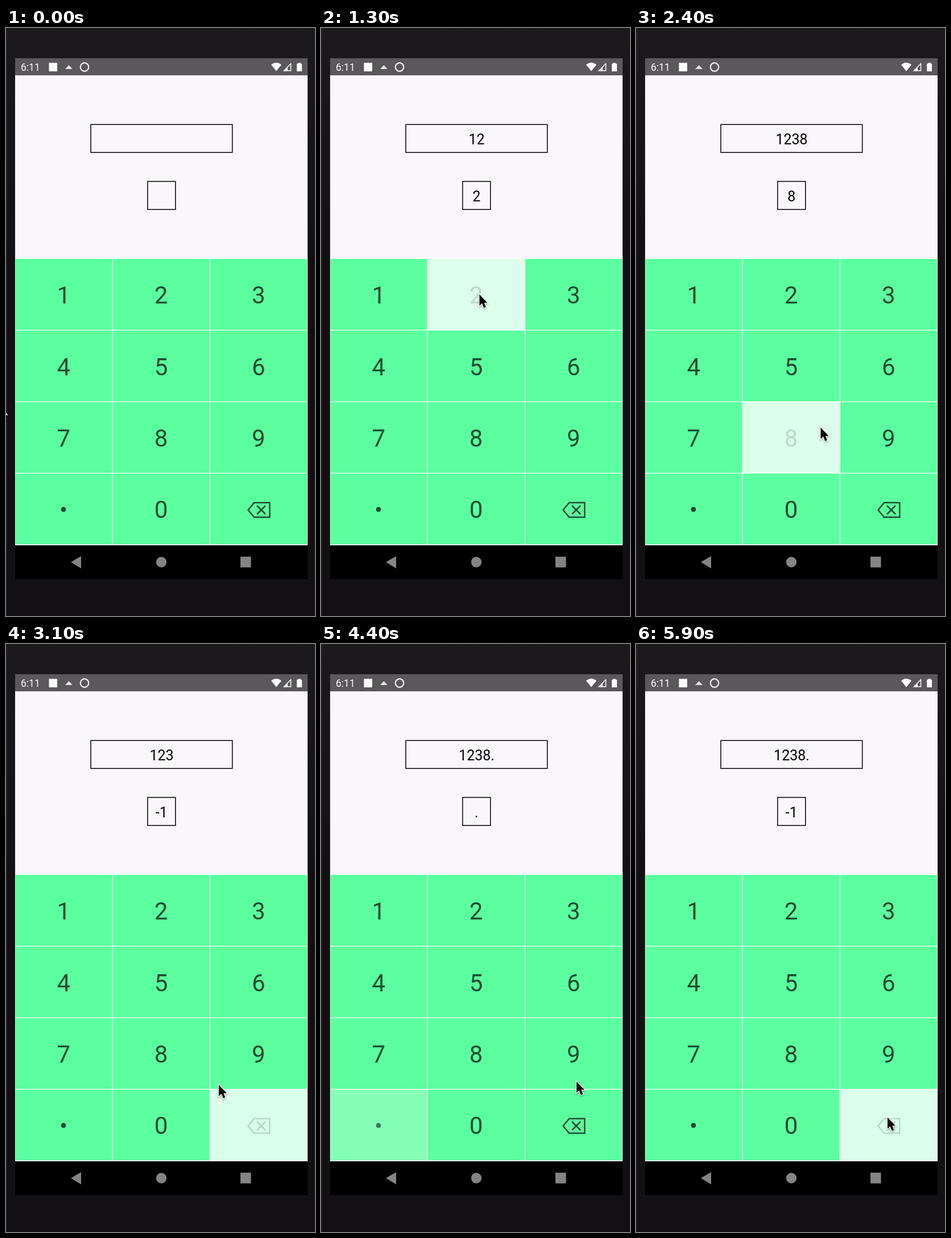
These frames come from a looping animation (543 px wide and 1031 px high, 6 s). An HTML page with a canvas:

```html
<!DOCTYPE html>
<html lang="en">
<head>
<meta charset="utf-8">
<title>Number pad</title>
<style>
html, body { margin: 0; width: 543px; height: 1031px; overflow: hidden; background: #131113; }
canvas { display: block; }
</style>
</head>
<body>
<canvas id="stage" width="543" height="1031"></canvas>
<script>
const g = document.getElementById('stage').getContext('2d');
const LOOP = 6000, STEP = 100;
const LEFT = 16, TOP = 404.4, KEY_W = 171.2, KEY_H = 125.4, GAP = 0.6;
const KEYS = '123456789.0<', INK = 'rgba(0,0,0,.7)';
const HOLD = 240, LEAD = 30, GLIDE = 170;

// Where the pointer rests and when it lets go of each key (ms)
const STOPS = [
  { up: LEAD, x: -14, y: 661 },
  { key: '1', up: 723, x: 90, y: 472 },
  { key: '2', up: 1290, x: 232, y: 482 },
  { key: '3', up: 1765, x: 425, y: 410 },
  { key: '8', up: 2380, x: 275, y: 650 },
  { key: '<', up: 3070, x: 440, y: 815 },
  { key: '8', up: 3627, x: 250, y: 690 },
  { key: '.', up: 4250, x: 96, y: 868 },
  { key: '9', up: 5099, x: 448, y: 765 },
  { key: '<', up: 5880, x: 441, y: 828, hold: 560 }
];
const PRESSES = STOPS.slice(1);

const clamp = p => Math.max(0, Math.min(1, p));
const ease = p => p < 0.5 ? 2 * p * p : 1 - 2 * (1 - p) ** 2;
const mix = (a, b, p) => a + (b - a) * p;

function rect(color, x, y, w, h) {
  g.fillStyle = color;
  g.fillRect(x, y, w, h);
}

function disc(color, x, y, r) {
  g.fillStyle = color;
  g.beginPath();
  g.arc(x, y, r, 0, 7);
  g.fill();
}

function shape(color, d) {
  g.fillStyle = color;
  g.fill(new Path2D(d));
}

function line(color, width, d) {
  g.strokeStyle = color;
  g.lineWidth = width;
  g.stroke(new Path2D(d));
}

function text(str, x, y, size, color, align = 'center') {
  g.font = size + 'px Roboto, sans-serif';
  g.textAlign = align;
  g.fillStyle = color;
  g.fillText(str, x, y);
}

function drawPhone() {
  const body = g.createLinearGradient(0, 0, 0, 400);
  body.addColorStop(0, '#1b191b');
  body.addColorStop(1, '#121013');
  rect(body, 0, 0, 543, 1031);
  line('#2a282b', 1, 'M4 0Q1.5 10 1.5 30V1031');

  rect('#5a585b', 16, 53, 514, 30);
  text('6:11', 26, 75, 17.5, '#fff', 'left');
  rect('#fff', 75.5, 61, 14.5, 15);
  shape('#e4e3e4', 'M104 72L110.5 65L117 72Z');
  line('#efeeef', 2.2, 'M130.8 68.5a7.2 7.2 0 1 1 0 .01Z');
  shape('#fff', 'M466 64.5Q475 57 484 64.5L475 75.5Z');
  line('#fff', 1.5, 'M488.5 74.8H500.5V62.5Z');
  shape('#fff', 'M487 75.5L495 67.5V75.5Z');
  shape('#fff', 'M511 62.5H513.5V61H517.5V62.5H520V76H511Z');

  rect('#f9f7fb', 16, 83, 514, 322);
  rect('#fff', 16, TOP, 514, 907 - TOP);
  line('#000', 1.5, 'M149 169.2H397.7V218.2H149Z M248.8 269H297.8V318.2H248.8Z');

  rect('#000', 16, 907, 514, 59.5);
  shape('#858385', 'M114 936.5L132 926V947.5Z');
  disc('#858385', 273, 936.5, 9.2);
  rect('#858385', 412, 927, 18.5, 18.8);
}

function keyAlpha(key, t) {
  let alpha = 1;
  for (const p of PRESSES) {
    const down = p.up - (p.hold || HOLD);
    if (p.key !== key || t < down) continue;
    alpha = t < p.up ? mix(1, 0.2, ease(clamp((t - down) / 150)))
                     : mix(0.2, 1, ease(clamp((t - p.up) / 250)));
  }
  return alpha;
}

function drawKey(key, i, t) {
  const x = LEFT + i % 3 * KEY_W, y = TOP + Math.floor(i / 3) * KEY_H;
  const cx = x + KEY_W / 2, cy = y + KEY_H / 2;
  g.globalAlpha = keyAlpha(key, t);
  rect('#5cff9f', x + GAP, y + GAP, KEY_W - 2 * GAP, KEY_H - 2 * GAP);
  if (key === '.') {
    disc(INK, cx - 0.6, cy + 0.8, 4.4);
  } else if (key === '<') {
    line(INK, 2.6, 'M425.5 845L436 832.3H463.3V857.8H436ZM441 837.5L456 852.5M456 837.5L441 852.5');
  } else {
    text(key, cx - 0.2, cy + 16.1, 42, INK);
  }
  g.globalAlpha = 1;
}

function drawFields(t) {
  let value = '', last = '';
  for (const { key, up } of PRESSES) {
    if (t < up) break;
    const erase = key === '<';
    value = erase ? value.slice(0, -1) : value + key;
    last = erase ? '-1' : key;
  }
  text(value, 273.5, 204, 25, '#000');
  text(last, 273.2, 304, 25, '#000');
}

function drawPointer(t) {
  const n = STOPS.findLastIndex(s => s.up - LEAD <= t);
  const from = STOPS[n], to = STOPS[n + 1] || from;
  const p = clamp((t - from.up + LEAD) / GLIDE);
  const arrow = 'M1 2V22L5.6 17.8L8.8 25.7L12.4 24.2L9.2 16.6H15Z';
  g.save();
  g.translate(mix(from.x, to.x, p), mix(from.y, to.y, p));
  g.shadowColor = 'rgba(0,0,0,.35)';
  g.shadowBlur = 3;
  g.shadowOffsetY = 1.5;
  line('#fff', 2.4, arrow);
  g.shadowColor = 'transparent';
  shape('#000', arrow);
  g.restore();
}

function frame(now) {
  const t = Math.floor(now % LOOP / STEP) * STEP;
  drawPhone();
  [...KEYS].forEach((key, i) => drawKey(key, i, t));
  drawFields(t);
  drawPointer(t);
  requestAnimationFrame(frame);
}
requestAnimationFrame(frame);
</script>
</body>
</html>
```
